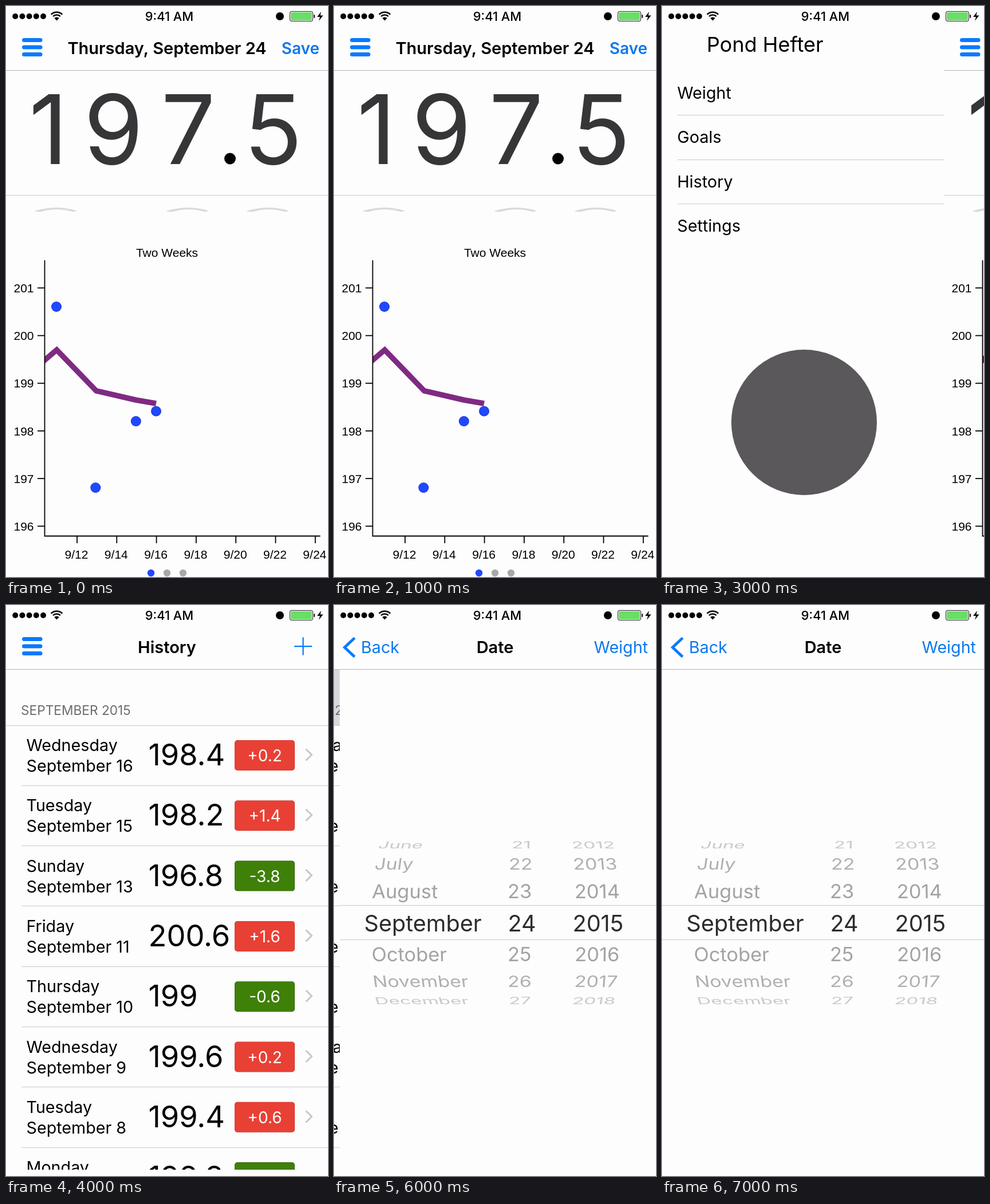
Recreate the animation shown at these times as an HTML page with a canvas. Size 562 by 997 pixels, loop 8000 ms.

```html
<!DOCTYPE html>
<html lang="en">
<head>
<meta charset="utf-8">
<title>Weight log</title>
<style>
html, body { margin: 0; width: 100%; height: 100%; overflow: hidden; background: #fdfdfd; }
canvas { display: block; width: 562px; height: 997px; }
</style>
</head>
<body>
<canvas id="stage" width="562" height="997"></canvas>
<script>
const W = 562, H = 997, LOOP = 8000;
const ctx = document.getElementById('stage').getContext('2d');
const UI = 'Inter, sans-serif', CHART = '"Liberation Sans", sans-serif';
const PAPER = '#fdfdfd', BLUE = '#0a7aff', LINK = '#0c78ee', DOT = '#2148ff', RULE = '#c8c8ca';
const BODY = 28.7;

function text(str, x, y, size, { color = '#000', align = 'left', weight = 400, family = UI } = {}) {
  ctx.font = `${weight} ${size}px ${family}`;
  ctx.textAlign = align;
  ctx.fillStyle = color;
  ctx.fillText(str, x, y);
}

function rect(x, y, w, h, color) {
  ctx.fillStyle = color;
  ctx.fillRect(x, y, w, h);
}

function roundRect(x, y, w, h, r, color) {
  ctx.beginPath();
  ctx.roundRect(x, y, w, h, r);
  ctx.fillStyle = color;
  ctx.fill();
}

function circle(x, y, r, color) {
  ctx.beginPath();
  ctx.arc(x, y, r, 0, Math.PI * 2);
  ctx.fillStyle = color;
  ctx.fill();
}

function polyline(points, width, color) {
  ctx.beginPath();
  points.forEach(([x, y]) => ctx.lineTo(x, y));
  ctx.lineWidth = width;
  ctx.strokeStyle = color;
  ctx.stroke();
}

function layer(dx, clip, draw) {
  ctx.save();
  ctx.beginPath();
  ctx.rect(...clip);
  ctx.clip();
  ctx.translate(dx, 0);
  draw();
  ctx.restore();
}

function statusBar() {
  for (let i = 0; i < 5; i++) circle(16.2 + i * 12.2, 18, 5, '#000');
  ctx.strokeStyle = '#000';
  ctx.lineWidth = 2.6;
  for (const r of [9, 13.8]) {
    ctx.beginPath();
    ctx.arc(88.5, 24.5, r, -Math.PI * 0.75, -Math.PI * 0.25);
    ctx.stroke();
  }
  ctx.beginPath();
  ctx.moveTo(88.5, 25.5);
  ctx.arc(88.5, 25.5, 6, -Math.PI * 0.75, -Math.PI * 0.25);
  ctx.fillStyle = '#000';
  ctx.fill();
  text('9:41 AM', 285, 26, 21.8, { align: 'center', weight: 500 });
  circle(478, 18, 7, '#000');
  roundRect(495, 9, 41, 18, 4, '#222');
  roundRect(496, 10, 39, 16, 3, PAPER);
  roundRect(497, 11, 37, 14, 2, '#6ade66');
  roundRect(537, 15, 2.2, 6, 1, '#222');
  ctx.beginPath();
  [[550, 10], [543, 19], [548, 19], [546, 26], [553.5, 16.5], [548.5, 16.5]].forEach(([x, y]) => ctx.lineTo(x, y));
  ctx.fillStyle = '#000';
  ctx.fill();
}

function burger() {
  for (const y of [56, 68.5, 81]) roundRect(28, y, 35.5, 7, 3.5, BLUE);
}

function navBar(title) {
  text(title, 281, 84, 29, { align: 'center', weight: 600 });
  rect(0, 112, W, 1, '#b4b4b6');
}

function bigDigit(ch, center) {
  ctx.font = `400 168px ${UI}`;
  ctx.textAlign = 'left';
  const m = ctx.measureText(ch);
  text(ch, center - (m.actualBoundingBoxRight - m.actualBoundingBoxLeft) / 2, 276, 168, { color: '#363638' });
}

function wheelHint(x) {
  ctx.beginPath();
  ctx.moveTo(x, 357.5);
  ctx.quadraticCurveTo(x + 37, 346.5, x + 73, 357.5);
  ctx.lineTo(x + 67, 359.5);
  ctx.quadraticCurveTo(x + 37, 351, x + 9, 359.5);
  ctx.lineTo(x, 359);
  ctx.fillStyle = '#dadada';
  ctx.fill();
}

function chart() {
  text('Two Weeks', 281, 438, 21, { align: 'center', family: CHART });
  const trend = [[55, 629], [88.5, 600.5], [157.5, 672], [227, 688], [262, 694]];
  layer(0, [67, 440, 482, 486], () => polyline(trend, 9.5, '#7f2a83'));
  polyline([[67.5, 444], [67.5, 925.5], [548.5, 925.5]], 1.8, '#000');
  for (let i = 0; i < 6; i++) {
    const y = 492.3 + i * 83.2;
    polyline([[55, y], [67, y]], 1.8, '#000');
    text(String(201 - i), 48.5, y + 7.7, 21, { align: 'right', family: CHART });
  }
  for (let i = 0; i < 7; i++) {
    const x = 124 + i * 69.3;
    polyline([[x, 926], [x, 938]], 1.8, '#000');
    text(`9/${12 + 2 * i}`, x - 1, 965, 21, { align: 'center', family: CHART });
  }
  for (const [x, y] of [[88, 525], [156.3, 841], [226.8, 725], [262, 707.5]]) {
    circle(x, y, 9, '#1836d0');
    circle(x, y, 8, DOT);
  }
}

function homePage() {
  burger();
  navBar('Thursday, September 24');
  text('Save', 547, 84, 28, { color: LINK, align: 'right', weight: 600 });
  bigDigit('1', 70.5);
  bigDigit('9', 188);
  bigDigit('7', 318.5);
  bigDigit('5', 467.5);
  circle(391, 266.5, 10, '#000');
  rect(0, 330, W, 1, RULE);
  [51, 281, 421].forEach(wheelHint);
  chart();
  [DOT, '#a9a9a9', '#a9a9a9'].forEach((color, i) => circle(253 + i * 28, 990, 6.2, color));
}

function menuScreen() {
  text('Pond Hefter', 78, 80, 36);
  ['Weight', 'Goals', 'History', 'Settings'].forEach((item, i) => {
    const y = 162 + i * 77.3;
    text(item, 26.5, y, BODY);
    if (i < 3) rect(27, Math.round(y + 28.4), 465, 1, RULE);
  });
  circle(248, 727, 127, '#5a585a');
  layer(492, [492, 28, 70, H - 28], homePage);
}

const ENTRIES = [
  ['Wednesday', 16, '198.4', '+0.2'], ['Tuesday', 15, '198.2', '+1.4'],
  ['Sunday', 13, '196.8', '-3.8'], ['Friday', 11, '200.6', '+1.6'],
  ['Thursday', 10, '199', '-0.6'], ['Wednesday', 9, '199.6', '+0.2'],
  ['Tuesday', 8, '199.4', '+0.6'], ['Monday', 7, '198.8', '-0.2']
];

function historyRow([day, date, value, change], i) {
  const y = 210 + i * 105.3;
  const gain = change[0] === '+';
  text(day, 35.5, y + 45, BODY);
  text(`September ${date}`, 35.5, y + 81, BODY);
  text(value, 248.5, y + 70, 52.3);
  roundRect(399, y + 26, 105, 53, 5, gain ? '#cf372d' : '#356b08');
  roundRect(399.8, y + 26.8, 103.4, 51.4, 4.5, gain ? '#e94035' : '#3f8009');
  text(change, 451.5, y + 63, 28, { color: '#fff', align: 'center' });
  polyline([[523.5, y + 41.5], [533.5, y + 51.5], [523.5, y + 61.5]], 3, '#c7c7cc');
  rect(27, Math.round(y + 104.7), W - 27, 1, RULE);
}

function historyList(headerColor) {
  rect(0, 113, W, 97, headerColor);
  text('SEPTEMBER 2015', 26, 192, 22.7, { color: '#6d6d72' });
  rect(0, 210, W, 1, RULE);
  ENTRIES.forEach(historyRow);
}

function historyScreen() {
  burger();
  navBar('History');
  rect(503, 71, 31, 2.3, BLUE);
  rect(517.4, 56.5, 2.3, 31, BLUE);
  layer(0, [0, 113, W, 873], () => historyList(PAPER));
}

// Each wheel row: baseline, size, vertical squash, lean, grey.
const WHEEL = [
  [425, 33.3, 0.5, 0.3, '#c9c9cb'], [462, 34, 0.81, 0.14, '#b0b0b3'],
  [512, 34.4, 0.97, 0.03, '#a3a3a6'], [570, 39.6, 1, 0, '#2c2c2e'],
  [622, 34.4, 0.97, -0.03, '#a3a3a6'], [667, 34, 0.81, -0.14, '#b0b0b3'],
  [697, 33.3, 0.5, -0.3, '#c9c9cb']
];
const MONTHS = ['June', 'July', 'August', 'September', 'October', 'November', 'December'];
const MONTH_X = [66, 60, 56, 42.5, 56, 59, 63];
const DAY_X = [300, 295, 293, 293.5, 293, 293, 295];
const YEAR_X = [406, 408, 410, 406.5, 410, 409, 405];

function wheelText(str, x, row, lean) {
  const [y, size, squash, slant, color] = WHEEL[row];
  ctx.save();
  ctx.transform(1, 0, -slant * lean * squash, squash, x, y);
  text(str, 0, 0, size, { color });
  ctx.restore();
}

function datePicker() {
  rect(0, 113, W, H - 113, PAPER);
  rect(0, 524, W, 1, RULE);
  rect(0, 584, W, 1, RULE);
  layer(0, [0, 412, W, 286], () => WHEEL.forEach((_, i) => {
    wheelText(MONTHS[i], MONTH_X[i], i, 1);
    wheelText(String(21 + i), DAY_X[i], i, 0);
    wheelText(String(2012 + i), YEAR_X[i], i, -0.6);
  }));
}

function dateScreen(offset) {
  if (offset) layer(-0.3 * (W - offset), [0, 113, offset, 873], () => historyList('#d9d7db'));
  layer(offset, [offset, 113, W - offset, H - 113], datePicker);
  polyline([[36, 57.5], [18.5, 74], [36, 90.5]], 4.8, BLUE);
  text('Back', 47, 84, BODY, { color: LINK });
  navBar('Date');
  text('Weight', 548, 84, BODY, { color: LINK, align: 'right' });
}

function render(t) {
  rect(0, 0, W, H, PAPER);
  if (t < 2000) homePage();
  else if (t < 4000) menuScreen();
  else if (t < 6000) historyScreen();
  else dateScreen(t < 7000 ? 10 : 0);
  statusBar();
}

const start = performance.now();
function tick() {
  render((performance.now() - start) % LOOP);
  requestAnimationFrame(tick);
}
tick();
</script>
</body>
</html>
```
